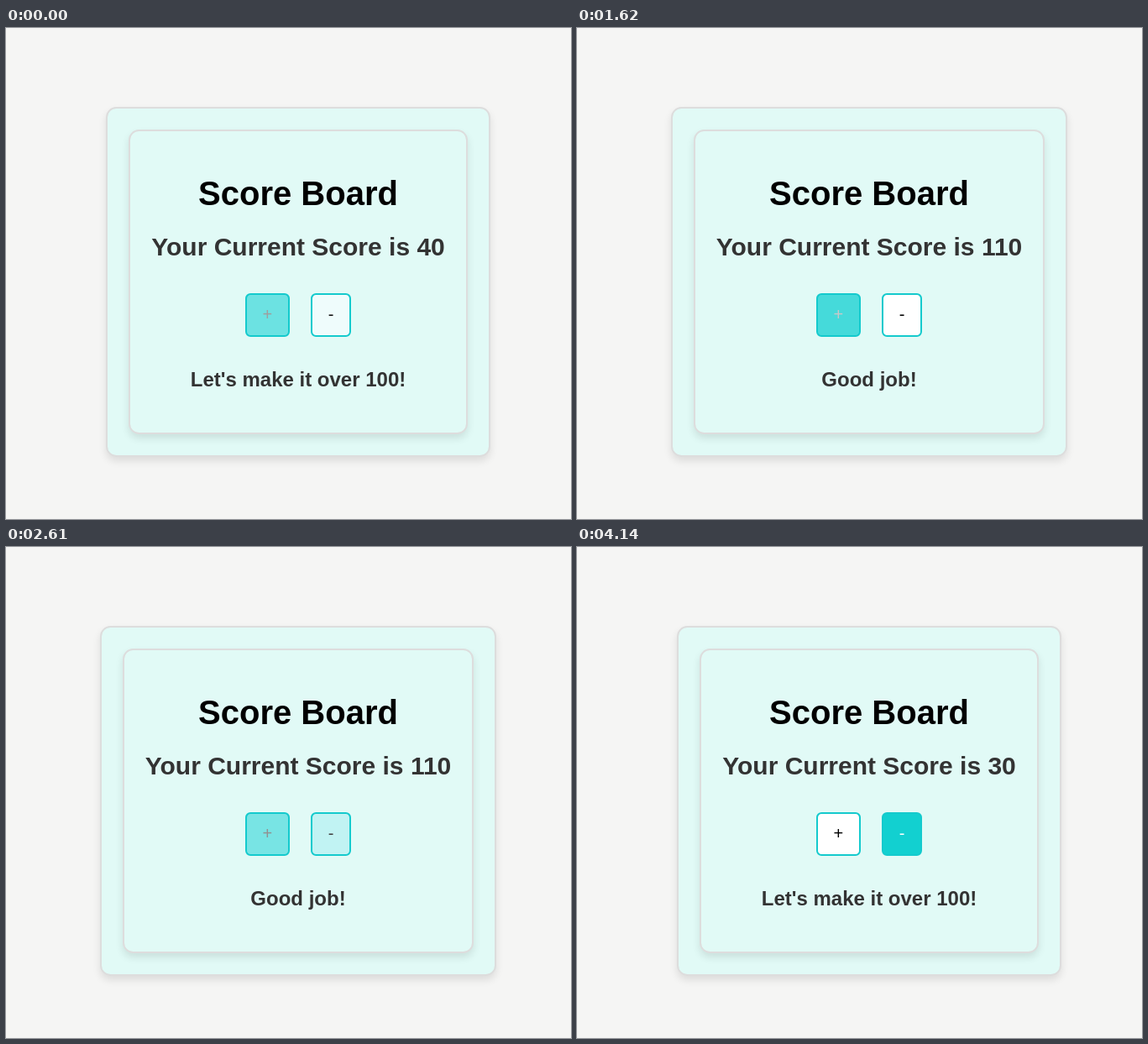
Write an HTML page that moves like this. It is 673 by 585 pixels and loops after 4.23 s.

```html
<!DOCTYPE html>
<html lang="en">
<head>
<meta charset="utf-8">
<title>Score Board</title>
<style>
  html, body { margin: 0; width: 100%; height: 100%; overflow: hidden; background: #f5f5f4; }
  * { box-sizing: border-box; }
  body { font-family: "Liberation Sans", Arial, sans-serif; color: #333; }
  .stage { position: absolute; top: 94px; left: 23px; right: 0; display: flex; justify-content: center; }
  .card {
    padding: 25px; border: 2px solid #ddd; border-radius: 12.5px; background: #e1faf6;
    box-shadow: 0 5px 10px rgba(0, 0, 0, .1); text-align: center; white-space: nowrap;
  }
  .outer { height: 417px; }
  .inner { height: 363px; }
  h1 { margin: 26px 0 24px; font-size: 40px; line-height: 46px; color: #000; }
  h2 { margin: 0 0 38px; font-size: 30px; line-height: 34px; }
  h3 { margin: 37px 0 0; font-size: 24px; line-height: 27px; }
  .buttons { display: flex; justify-content: center; gap: 25px; }
  button {
    padding: 12px 18.75px 13px; border: 2px solid #14cacd; border-radius: 6.25px;
    font: 20px/23px "Liberation Sans", Arial, sans-serif;
  }
</style>
</head>
<body>
<div class="stage">
  <div class="card outer">
    <div class="card inner">
      <h1>Score Board</h1>
      <h2 id="score"></h2>
      <div class="buttons">
        <button id="plus">+</button>
        <button id="minus">-</button>
      </div>
      <h3 id="message"></h3>
    </div>
  </div>
</div>
<script>
  const LOOP = 4230, STEP = 90, FADE = 400;
  const $ = id => document.getElementById(id);

  // Click times; each one moves the score by ten.
  const ups = [90, 270, 360, 450, 630, 810, 900, 2250];
  const downs = [1890, 2790, 3150, 3330, 3420, 3690, 3870, 3960, 4140];

  // Spans in which the pointer rests on each button.
  const hovers = {
    plus: [[-144, 1554], [1986, 2506]],
    minus: [[-2000, -272], [1640, 1954], [2536, 9000]]
  };

  const bezier = (s, a, b) => 3 * (1 - s) ** 2 * s * a + 3 * (1 - s) * s * s * b + s ** 3;

  // The CSS "ease" curve, solved by bisection.
  function ease(x) {
    if (x <= 0) return 0;
    if (x >= 1) return 1;
    let low = 0, high = 1;
    for (let i = 0; i < 20; i++) {
      const mid = (low + high) / 2;
      if (bezier(mid, .25, .25) < x) low = mid; else high = mid;
    }
    return bezier(low, .1, 1);
  }

  const mix = (from, to, k) => `rgb(${from.map((v, i) => Math.round(v + (to[i] - v) * k))})`;
  const count = (times, t) => times.filter(v => v <= t).length;

  function paintButton(id, t) {
    const level = hovers[id].reduce((sum, [enter, leave]) =>
      sum + ease((t - enter) / FADE) * (1 - ease((t - leave) / FADE)), 0);
    const style = $(id).style;
    style.backgroundColor = mix([255, 255, 255], [18, 208, 208], level);
    style.color = mix([0, 0, 0], [255, 255, 255], level);
  }

  function draw(now) {
    const t = Math.floor(now % LOOP / STEP) * STEP;
    const score = 40 + 10 * (count(ups, t) - count(downs, t));
    $("score").textContent = "Your Current Score is " + score;
    $("message").textContent = score > 100 ? "Good job!" : "Let's make it over 100!";
    paintButton("plus", t);
    paintButton("minus", t);
  }

  const start = performance.now();
  function tick() {
    draw(performance.now() - start);
    requestAnimationFrame(tick);
  }
  tick();
</script>
</body>
</html>
```
